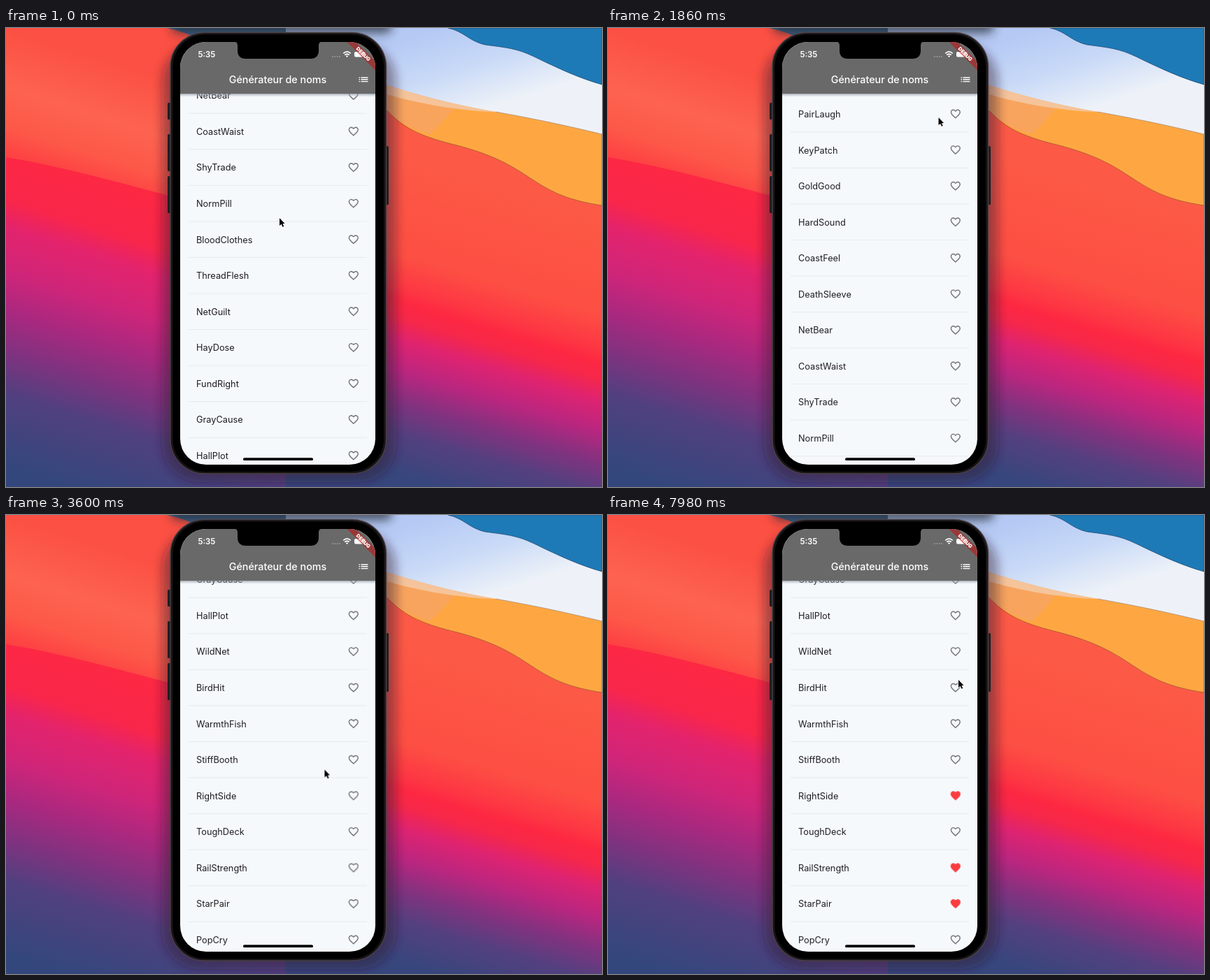
Recreate the animation shown at these times as an HTML page. Size 852 by 657 pixels, loop 8000 ms.

```html
<!DOCTYPE html>
<html lang="fr">
<head>
<meta charset="utf-8">
<title>Générateur de noms</title>
<style>
html, body { margin: 0; width: 100%; height: 100%; overflow: hidden; }
svg { display: block; width: 852px; height: 657px; font-family: Inter, Roboto, sans-serif; }
#list { animation: scroll 8s infinite; }
#cursor { animation: point 8s infinite ease-in-out; }
.name { font-size: 12.75px; fill: #1d1d20; }
.empty { fill: #747578; }
.full { fill: #fb3c3f; opacity: 0; }
.RightSide .full { animation: like-a 8s infinite; }
.RailStrength .full { animation: like-b 8s infinite; }
.StarPair .full { animation: like-c 8s infinite; }
.RightSide .empty { animation: unlike-a 8s infinite; }
.RailStrength .empty { animation: unlike-b 8s infinite; }
.StarPair .empty { animation: unlike-c 8s infinite; }

@keyframes scroll {
  0% { transform: translateY(-336.4px); animation-timing-function: cubic-bezier(.3, .45, .65, .9); }
  9.75% { transform: translateY(-93.6px); animation-timing-function: cubic-bezier(.25, .55, .5, 1); }
  16.5%, 24% { transform: translateY(0); animation-timing-function: cubic-bezier(.4, 0, .75, .9); }
  35.25% { transform: translateY(-715.8px); animation-timing-function: cubic-bezier(.2, .6, .4, 1); }
  44%, 100% { transform: translateY(-804px); }
}
@keyframes point {
  0% { transform: translate(391px, 272px); }
  9.75% { transform: translate(454px, 206px); }
  20%, 23.25% { transform: translate(472.5px, 128px); }
  28.5% { transform: translate(436px, 395px); }
  35.25%, 38% { transform: translate(426px, 342px); }
  54%, 66% { transform: translate(500.5px, 399px); }
  74%, 78.5% { transform: translate(499px, 502px); }
  84% { transform: translate(497px, 520px); }
  87%, 90.5% { transform: translate(499px, 553px); }
  98.5%, 100% { transform: translate(501px, 236px); }
}
@keyframes like-a { 0%, 62.99% { opacity: 0; } 63%, 100% { opacity: 1; } }
@keyframes like-b { 0%, 76.99% { opacity: 0; } 77%, 100% { opacity: 1; } }
@keyframes like-c { 0%, 89.49% { opacity: 0; } 89.5%, 100% { opacity: 1; } }
@keyframes unlike-a { 0%, 62.99% { opacity: 1; } 63%, 100% { opacity: 0; } }
@keyframes unlike-b { 0%, 76.99% { opacity: 1; } 77%, 100% { opacity: 0; } }
@keyframes unlike-c { 0%, 89.49% { opacity: 1; } 89.5%, 100% { opacity: 0; } }
</style>
</head>
<body>
<svg viewBox="0 0 852 657">
  <defs>
    <linearGradient id="coral" gradientUnits="userSpaceOnUse" x1="0" y1="0" x2="-54" y2="172">
      <stop stop-color="#fb5043"/><stop offset=".45" stop-color="#fd6350"/>
      <stop offset=".75" stop-color="#fd5848"/><stop offset="1" stop-color="#fd3d42"/>
    </linearGradient>
    <linearGradient id="dusk" gradientUnits="userSpaceOnUse" x1="-48" y1="153" x2="-180" y2="572">
      <stop stop-color="#fd2843"/><stop offset=".17" stop-color="#f8264a"/>
      <stop offset=".25" stop-color="#e4236c"/><stop offset=".39" stop-color="#cf2579"/>
      <stop offset=".51" stop-color="#ab287f"/><stop offset=".64" stop-color="#80327f"/>
      <stop offset=".77" stop-color="#51407f"/><stop offset="1" stop-color="#33477d"/>
    </linearGradient>
    <linearGradient id="slope" gradientUnits="userSpaceOnUse" x1="0" y1="0" x2="-130.5" y2="430.6">
      <stop stop-color="#fc5a46"/><stop offset=".33" stop-color="#fd4e43"/>
      <stop offset=".43" stop-color="#fd3643"/><stop offset=".47" stop-color="#fd2842"/>
      <stop offset=".52" stop-color="#f62749"/><stop offset=".59" stop-color="#de2371"/>
      <stop offset=".68" stop-color="#ba267f"/><stop offset=".77" stop-color="#85317f"/>
      <stop offset=".87" stop-color="#54407f"/><stop offset="1" stop-color="#37467d"/>
    </linearGradient>
    <linearGradient id="mist" gradientUnits="userSpaceOnUse" x1="620" y1="0" x2="660" y2="125">
      <stop stop-color="#b5c9f4"/><stop offset=".5" stop-color="#c9daf7"/><stop offset="1" stop-color="#eef2f8"/>
    </linearGradient>
    <linearGradient id="haze" gradientUnits="userSpaceOnUse" x1="546" y1="0" x2="700" y2="0">
      <stop stop-color="#f7a35f"/><stop offset=".55" stop-color="#f9a55c"/><stop offset="1" stop-color="#fea742"/>
    </linearGradient>
    <linearGradient id="under" x2="0" y2="1">
      <stop stop-color="#7d8794" stop-opacity=".7"/><stop offset="1" stop-color="#c5ccd5" stop-opacity="0"/>
    </linearGradient>
    <filter id="soft" x="-20%" y="-20%" width="140%" height="140%"><feGaussianBlur stdDeviation="7"/></filter>
    <clipPath id="screen"><rect x="249" y="20" width="279" height="605" rx="37"/></clipPath>
    <path id="heart" d="M12 21.35l-1.45-1.32C5.4 15.36 2 12.28 2 8.5 2 5.42 4.42 3 7.5 3c1.74 0 3.41.81 4.5 2.09C13.09 3.81 14.76 3 16.5 3 19.58 3 22 5.42 22 8.5c0 3.78-3.4 6.86-8.55 11.54z"/>
    <path id="outline" d="M16.5 3c-1.74 0-3.41.81-4.5 2.09C10.91 3.81 9.24 3 7.5 3 4.42 3 2 5.42 2 8.5c0 3.78 3.4 6.86 8.55 11.54L12 21.35l1.45-1.32C18.6 15.36 22 12.28 22 8.5 22 5.42 19.58 3 16.5 3zm-4.4 15.55l-.1.1-.1-.1C7.14 14.24 4 11.39 4 8.5 4 6.5 5.5 5 7.5 5c1.54 0 3.04.99 3.57 2.36h1.87C13.46 5.99 14.96 5 16.5 5c2 0 3.5 1.5 3.5 3.5 0 2.89-3.14 5.74-7.9 10.05z"/>
  </defs>

  <!-- wallpaper -->
  <rect width="400" height="657" fill="url(#coral)"/>
  <path d="M0 185C80 198 160 221 240 242L400 285V657H0Z" fill="url(#dusk)"/>
  <path d="M230 0Q262 6 300 28H400V0Z" fill="#3d648c"/>
  <rect x="400" width="452" height="657" fill="url(#slope)"/>
  <path d="M400 0H852V254C800 246 778 234 745 212C715 192 690 180 645 168C600 157 570 146 545 118H400Z" fill="#fea742" stroke="#a8542c" stroke-width=".8"/>
  <path d="M500 60H700L645 108Q632 128 606 152Q568 142 545 118H500Z" fill="url(#haze)"/>
  <path d="M400 0H852V152C790 137 750 129 700 120C640 110 590 96 545 82H400Z" fill="url(#mist)"/>
  <path d="M545 82C590 96 640 110 700 120C670 120 600 112 545 95Z" fill="#f5c49a"/>
  <path d="M700 120C750 129 790 137 852 152" fill="none" stroke="#a88370" stroke-width=".7"/>
  <path d="M632 0C655 5 662 19 685 24C715 28 730 29 755 41C790 58 820 72 852 81V0Z" fill="#1e7ab7" stroke="#244c70" stroke-width=".8"/>

  <!-- phone -->
  <g filter="url(#soft)">
    <rect x="223" y="22" width="335" height="628" rx="54" fill="#2c1a2c" opacity=".42"/>
    <rect x="236" y="-16" width="316" height="24" rx="10" fill="#252832" opacity=".7"/>
  </g>
  <g fill="#201d20">
    <rect x="231" y="107" width="6" height="24" rx="1.5"/>
    <rect x="231" y="152" width="6" height="53" rx="1.5"/>
    <rect x="231" y="212" width="6" height="53" rx="1.5"/>
    <rect x="542" y="169" width="5" height="84" rx="1.5"/>
  </g>
  <rect x="235" y="6.5" width="308.5" height="631.5" rx="49" fill="#171416" stroke="#4b4145" stroke-width="1.4"/>
  <rect x="238.500" y="9.500" width="301.500" height="625.500" rx="46"/>

  <g clip-path="url(#screen)">
    <rect x="249" y="20" width="279" height="605" fill="#f6f9fb"/>
    <g id="list"></g>
    <rect x="249" y="94" width="279" height="5" fill="url(#under)"/>
    <rect x="249" y="20" width="279" height="74" fill="#696969"/>
    <text x="388.500" y="79" text-anchor="middle" font-size="14.3" font-weight="500" fill="#fff">Générateur de noms</text>
    <path transform="translate(502.400 65.200) scale(.716)" fill="#fff" d="M3 7h2v2H3zM3 11h2v2H3zM3 15h2v2H3zM7 7h14v2H7zM7 11h14v2H7zM7 15h14v2H7z"/>
    <text x="274.500" y="42" font-size="11.400" font-weight="600" fill="#fff">5:35</text>
    <path d="M466 41h12" stroke="#929292" stroke-width="1.800" stroke-dasharray="1.800 1.600"/>
    <g fill="none" stroke="#fff" stroke-width="1.700">
      <path d="M482.300 36.300Q487.500 31.600 492.700 36.300M484.300 38.700Q487.500 35.800 490.700 38.700"/>
    </g>
    <path d="M485.800 40.200Q487.500 38.800 489.200 40.200L487.500 42Z" fill="#fff"/>
    <rect x="498" y="34" width="16" height="7.500" rx="2" fill="#fff"/>
    <g transform="translate(528 20) rotate(45)">
      <rect x="-30" y="20" width="60" height="8.600" fill="#b71c1c" opacity=".63"/>
      <text y="26.900" text-anchor="middle" font-size="7.300" font-weight="900" fill="#fff">DEBUG</text>
    </g>
    <rect x="339" y="615.300" width="100" height="3.700" rx="1.850"/>
  </g>
  <path d="M326 19Q331 20 331 25V32Q331 44 343 44H435Q447 44 447 32V25Q447 20 452 19Z"/>

  <g id="cursor">
    <path d="M0 0V11L2.600 8.700L4.400 12.700L6.200 12L4.500 8H7.600Z" stroke="#fff" stroke-width="1.300" paint-order="stroke" stroke-linejoin="round"/>
  </g>
</svg>
<script>
const names = `PairLaugh KeyPatch GoldGood HardSound CoastFeel DeathSleeve NetBear CoastWaist
  ShyTrade NormPill BloodClothes ThreadFlesh NetGuilt HayDose FundRight GrayCause HallPlot
  WildNet BirdHit WarmthFish StiffBooth RightSide ToughDeck RailStrength StarPair PopCry`.split(/\s+/);
const firstRow = 123, pitch = 51.56;

document.getElementById("list").innerHTML = names.map((name, i) => `
  <g class="${name}" transform="translate(0 ${firstRow + i * pitch})">
    <text class="name" x="272" y="4.900">${name}</text>
    <g transform="translate(488.200 -8.600) scale(.716)">
      <use href="#outline" class="empty"/><use href="#heart" class="full"/>
    </g>
    <path d="M261 ${pitch / 2}H516" stroke="#e6eaed"/>
  </g>`).join("");
</script>
</body>
</html>
```
